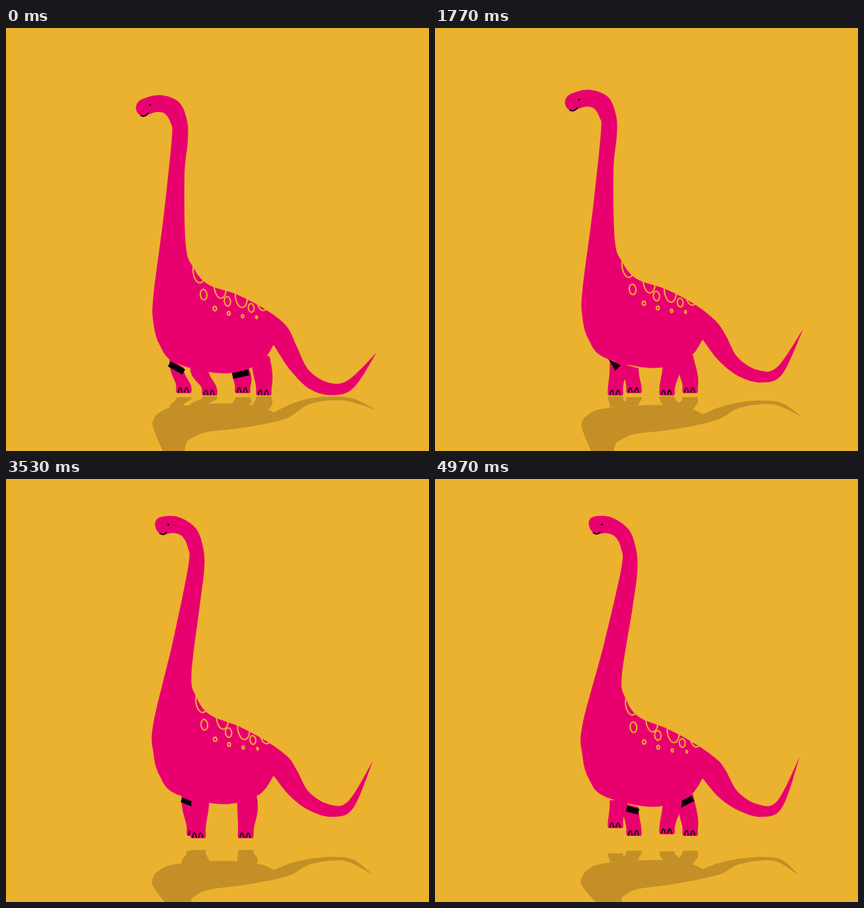
Animation, 640 px wide and 640 px high, one loop 5010 ms. Source, as an HTML page:

```html
<!DOCTYPE html>
<html lang="en">
<head>
<meta charset="utf-8">
<title>Hopping dinosaur</title>
<style>
  html, body { margin: 0; width: 100%; height: 100%; overflow: hidden; background: #ebb22f; }
  svg { display: block; width: 100vw; height: 100vh; }
</style>
</head>
<body>
<svg id="stage" viewBox="0 0 640 640"></svg>
<script>
const PINK = '#e9006f', YELLOW = '#ebb22f', SHADE = '#c48f27', INK = '#17060c';
const LOOP = 5010, FRAMES = 150, CYCLE = 20, HOP = 10, GROUND = 557, SQUASH = 0.32, BELLY = 522;

// Key points of the crouched silhouette; every pose is a warp of these.
const crest = [[208,134], [199,128], [197,117], [206,107], [234,101], [262,112], [274,140], [275,170],
  [270,225], [272,328], [283,361], [305,387], [350,403], [392,425], [424,450], [440,483],
  [458,519], [488,538], [518,534], [561,495]];
const tailUnder = [[561,495], [526,546], [494,557], [460,548], [430,518], [405,479]];
const belly = [[405,479], [382,508], [328,522], [256,506], [232,478], [223,445], [223,405], [239,280],
  [251,165], [249,143], [240,129], [226,127], [208,134]];

const clamp = x => Math.max(0, Math.min(1, x));
const ease = x => { const c = clamp(x); return c * c * (3 - 2 * c); };
const arch = x => Math.sin(Math.PI * clamp(x));
const ramp = (p, from, length) => ease((p - from) / length);

// Three beats of stance, then seven in the air.
function poseAt(phase) {
  const p = phase % HOP;
  const flight = clamp((p - 3) / 7);
  const stretch = ramp(phase, 2.5, 3.5) - ramp(phase, 8, 4) + ramp(phase, 12.5, 3.5) - ramp(phase, 16, 4);
  const swing = 1 - 2 * ramp(phase, 3, 4) + 2 * ramp(phase, 13, 4);
  return {
    stretch, swing,
    bellyY: 522.5 - 9 * ease(p / 2.5) + 9.5 * flight - 31 * arch(flight),
    lift: 16 * arch(flight),
    step: 16 * arch((p - 5) / 5),
    nearSteps: phase < HOP,
    wag: 0.5 + 0.5 * Math.cos((phase - 8) * 2 * Math.PI / CYCLE),
    jointOpen: Math.max(stretch, (swing + 1) / 2)
  };
}

function warpBody({ stretch, bellyY }) {
  return ([x, y]) => {
    const reach = ease((400 - y + (x - 235) / 2) / 230);
    const head = ease((170 - y) / 30);
    const tilt = 0.07 * (x - 320) * ease((460 - y) / 60);
    return [
      x + stretch * (31 * reach + head * 0.07 * (268 - x)),
      y + stretch * (tilt + head * (0.2 * (x - 268) - 4)) + bellyY - BELLY
    ];
  };
}

function warpTail({ wag, bellyY }) {
  return ([x, y]) => {
    const curl = clamp((x - 510) / 50) ** 2;
    return [x - 9 * curl * wag * wag, y - wag * (20 * ease((x - 405) / 50) + 29 * curl) + bellyY - BELLY];
  };
}

const stage = document.getElementById('stage');
function add(parent, name, attrs = {}) {
  const node = document.createElementNS('http://www.w3.org/2000/svg', name);
  for (const key in attrs) node.setAttribute(key, attrs[key]);
  return parent.appendChild(node);
}

add(stage, 'rect', { width: 640, height: 640, fill: YELLOW });
const shadow = add(stage, 'g', {
  fill: SHADE, transform: `matrix(1 0 0 ${-SQUASH} 0 ${GROUND * (1 + SQUASH)})`
});
const dino = add(stage, 'g', { fill: PINK });

// foot and hip: middle of the swing and how far it goes; tuck: shift while crossing.
const legs = [
  { near: false, foot: [285, -16], hip: [277, -19], tuck: 0, hipY: -2, drop: 0.33, angle: 22, turn: -0.4 },
  { near: false, foot: [372, -14], hip: [367, -12], tuck: -9, hipY: -3, drop: -0.35, angle: -19, turn: -0.6, hind: true },
  { near: true, foot: [290.5, 17.5], hip: [285, 7], tuck: 0, hipTuck: 9, hipY: -10 },
  { near: true, foot: [370.5, 19.5], hip: [372, 13], tuck: -8, hipTuck: -9, hipY: -26, hind: true }
];
for (const leg of legs) {
  leg.shade = add(shadow, 'path');
  leg.skin = add(dino, 'path');
  leg.toes = add(dino, 'path', { fill: 'none', stroke: INK, 'stroke-width': 2 });
  if (!leg.near) leg.band = add(dino, 'path', { fill: 'none', stroke: '#000' });
}
const armpit = add(dino, 'path', { fill: '#000' });
const bodyShade = add(shadow, 'path');
const body = add(dino, 'path');

const spots = [];
function addSpot(x, y, rx, ry) {
  const node = add(dino, 'ellipse', { rx, ry, fill: 'none', stroke: YELLOW, 'stroke-width': 2 });
  spots.push({ x, y, node });
}
for (let i = 0; i < 4; i++) {
  const slope = (1 - i / 3) ** 2;
  addSpot(292 + 32 * i, 410 - 42 * slope, 9, 17);
  addSpot(316 + 21 * i, 437 - 13 * slope, 2.5 - 0.4 * i, 3.2 - 0.4 * i);
  if (i < 3) addSpot(299 + 36 * i, 403 + 10 * i, 5 - 0.3 * i, 8 - 0.7 * i);
}
const eye = add(dino, 'circle', { r: 1.6, fill: INK });
const mouth = add(dino, 'path', { fill: 'none', stroke: INK, 'stroke-width': 2, 'stroke-linecap': 'round' });

const pt = (x, y) => x.toFixed(2) + ' ' + y.toFixed(2);

function spline(points) {
  return points.slice(1).map((q, i) => {
    const p = points[i], before = points[i - 1] || p, after = points[i + 2] || q;
    return `C${pt(p[0] + (q[0] - before[0]) / 6, p[1] + (q[1] - before[1]) / 6)} `
      + `${pt(q[0] - (after[0] - p[0]) / 6, q[1] - (after[1] - p[1]) / 6)} ${pt(...q)}`;
  }).join('');
}

function drawLeg(leg, pose) {
  const s = pose.swing, crossing = 1 - s * s;
  const stepping = leg.near === pose.nearSteps;
  const fx = leg.foot[0] + leg.foot[1] * s + leg.tuck * crossing;
  const fy = (leg.near ? 556 : 552.5) - pose.lift - (stepping ? pose.step * (leg.hind ? 0.4 : 1) : 0);
  const sway = leg.hip[1] * s;
  const hx = leg.hip[0] + sway + (leg.hipTuck || 0) * crossing;
  const hy = pose.bellyY + leg.hipY + (leg.drop || 0) * sway;
  const angle = ((leg.angle || 0) + (leg.turn || 0) * sway) * Math.PI / 180;
  const half = leg.near ? 13.5 : 12.5;
  const ux = half * Math.cos(angle), uy = half * Math.sin(angle);
  const ax = hx - ux, bx = hx + ux, up = leg.near ? 0 : 7;
  const ay = hy - uy - up, by = hy + uy - up;
  const top = fy - 8, bow = leg.hind ? 6 : 0;
  const d = `M${pt(ax, ay)}C${pt(ax, ay + (top - ay) * 0.6)} ${pt(fx - 11, top - (top - ay) * 0.3)} ${pt(fx - 11.5, top)}`
    + `Q${pt(fx - 12.5, fy)} ${pt(fx - 9, fy)}L${pt(fx + 10, fy)}Q${pt(fx + 12.5, fy)} ${pt(fx + 11.5, top)}`
    + `C${pt(fx + 11 + bow / 2, top - (top - by) * 0.35)} ${pt(bx + bow, by + (top - by) * 0.5)} ${pt(bx, by)}Z`;
  leg.skin.setAttribute('d', d);
  leg.shade.setAttribute('d', d);
  leg.toes.setAttribute('d', [-5.5, 4].map(x => `M${pt(fx + x - 3, fy - 1)}q3 -14 6 0`).join(''));
  if (leg.band) {
    leg.band.setAttribute('d', `M${pt(ax, ay + up)}L${pt(bx, by + up)}`);
    leg.band.setAttribute('stroke-width', 9 * pose.jointOpen);
  }
}

function render(frame) {
  // One frame is held twice, so everything after it runs a step later.
  const pose = poseAt((frame > 33 ? frame - 1 : frame) % CYCLE);
  const onBody = warpBody(pose), onTail = warpTail(pose);
  const place = p => p[0] > 430 || p[0] === 405 ? onTail(p) : onBody(p);

  const top = crest.map(place);
  const d = `M${pt(...top[0])}${spline(top)}${spline(tailUnder.map(onTail))}${spline(belly.map(place))}Z`;
  body.setAttribute('d', d);
  bodyShade.setAttribute('d', d);

  for (const leg of legs) drawLeg(leg, pose);
  armpit.setAttribute('d', 'M-10 -14L9 -4L1 4Z');
  armpit.setAttribute('transform', `translate(${pt(272, pose.bellyY)}) scale(${1 - pose.jointOpen})`);

  for (const { x, y, node } of spots) {
    node.setAttribute('transform', `translate(${pt(...onBody([x, y]))}) rotate(-6)`);
  }
  eye.setAttribute('transform', `translate(${pt(...onBody([218, 116]))})`);
  const [left, dip, right] = [[204, 132], [211, 135], [215, 128]].map(onBody);
  mouth.setAttribute('d', `M${pt(...left)}Q${pt(...dip)} ${pt(...right)}`);
}

const start = performance.now();
function tick(now) {
  const t = Math.max(0, now - start) % LOOP;
  render(Math.min(FRAMES - 1, Math.floor((t + 4) * FRAMES / 5000)));
  requestAnimationFrame(tick);
}
render(0);
requestAnimationFrame(tick);
</script>
</body>
</html>
```
